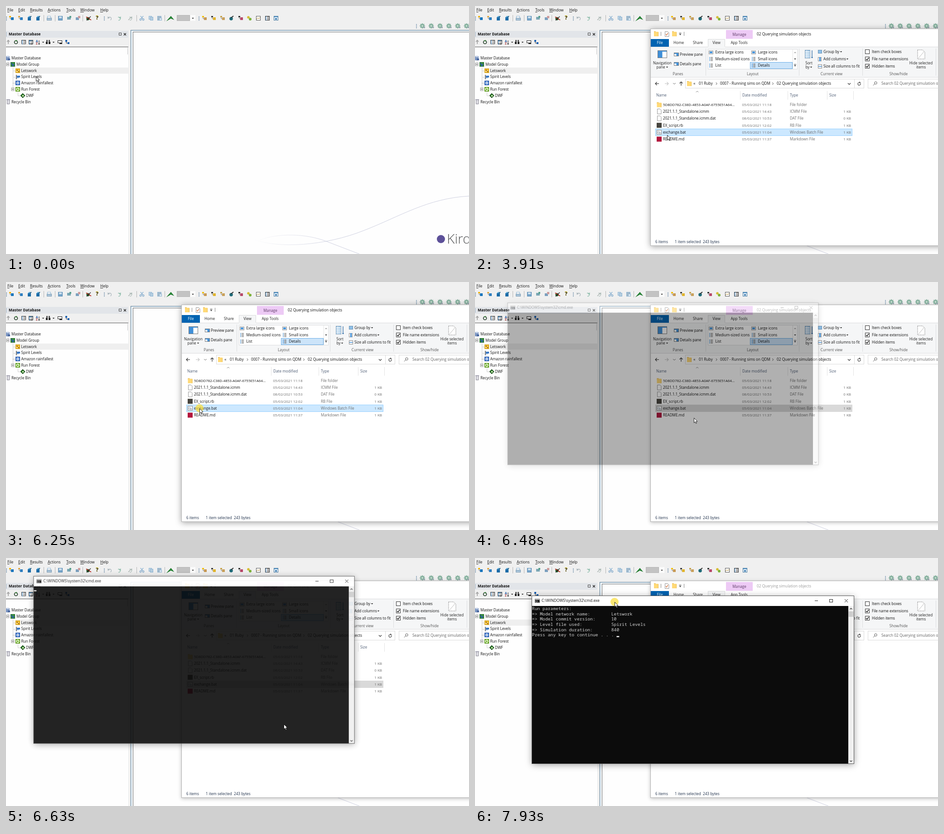
An HTML page with a canvas for the animation above (8 s loop, 1022x548 px).

```html
<!DOCTYPE html>
<html lang="en">
<head>
<meta charset="utf-8">
<title>Running a batch script</title>
<style>
html, body { margin: 0; width: 100%; height: 100%; overflow: hidden; background: #f0f0f0; }
canvas { display: block; }
</style>
</head>
<body>
<canvas id="stage" width="1022" height="548"></canvas>
<script>
const W = 1022, H = 548, LOOP = 8000;
const UI = '"Open Sans", "Noto Sans", sans-serif';
const MONO = '"Noto Sans Mono", "DejaVu Sans Mono", monospace';
const screen2d = document.getElementById('stage').getContext('2d');
let c = screen2d;

// ---- drawing helpers ----
function rect(x, y, w, h, fill, stroke) {
  if (fill) { c.fillStyle = fill; c.fillRect(x, y, w, h); }
  if (stroke) { c.strokeStyle = stroke; c.lineWidth = 1; c.strokeRect(x + .5, y + .5, w - 1, h - 1); }
}
function path(pts, stroke, width = 1, fill) {
  c.beginPath();
  for (let i = 0; i < pts.length; i += 2) c.lineTo(pts[i], pts[i + 1]);
  if (fill) { c.closePath(); c.fillStyle = fill; c.fill(); }
  if (stroke) { c.strokeStyle = stroke; c.lineWidth = width; c.stroke(); }
}
function disc(x, y, r, fill, stroke, width = 1, a = 0, b = 7) {
  c.beginPath();
  c.arc(x, y, r, a, b);
  if (fill) { c.fillStyle = fill; c.fill(); }
  if (stroke) { c.strokeStyle = stroke; c.lineWidth = width; c.stroke(); }
}
function text(s, x, y, color = '#111', size = 8.2, align = 'left', weight = 400, family = UI) {
  c.font = `${weight} ${size}px ${family}`;
  c.textAlign = align;
  c.fillStyle = color;
  c.fillText(s, x, y + 2.9);
}
const mid = (s, x, y, color = '#222') => text(s, x, y, color, 8.2, 'center');
const down = (x, y, color = '#222', r = 2.2) => path([x - r, y - 1, x + r, y - 1, x, y + r - .8], null, 0, color);
const chevron = (x, y, dx, dy, color = '#444', w = 1) =>
  path(dx ? [x - dx, y - 2.5, x + dx, y, x - dx, y + 2.5] : [x - 3, y - dy, x, y + dy, x + 3, y - dy], color, w);
function layer(draw) {
  const cv = document.createElement('canvas');
  cv.width = W; cv.height = H;
  c = cv.getContext('2d');
  draw();
  c = screen2d;
  return cv;
}
function frameWithShadow(x, y, w, h, alpha, blur) {
  c.save();
  c.shadowColor = `rgba(0,0,0,${alpha})`;
  c.shadowBlur = blur;
  c.shadowOffsetY = 2;
  rect(x, y, w, h, '#fff');
  c.restore();
}

// ---- small icons, centred on x, y ----
function grip(x, y) { for (let i = -4; i <= 4; i += 2.6) rect(x - .7, y + i, 1.5, 1.3, '#466f94'); }
function mini(x, y, a, b) {
  rect(x - 1, y - 2, 6, 6, b);
  rect(x - 5, y - 5, 4, 3, a);
  path([x - 3, y - 2, x - 3, y + 1, x - 1, y + 1], '#666', .8);
}
function folder(x, y) {
  rect(x - 5, y - 5, 4, 3, '#e3b34b');
  rect(x - 5, y - 4, 10, 10, '#ffd977');
  rect(x + 4, y - 3, 1, 9, '#e8bb50');
}
function sheet(x, y) {
  path([x - 4, y - 5.5, x + 2, y - 5.5, x + 4.5, y - 3, x + 4.5, y + 5.5, x - 4, y + 5.5, x - 4, y - 5.5], '#8a8a8a', .9, '#fff');
}
function pane(x, y, w, h, side) {
  rect(x, y, w, h, '#fff', '#777');
  rect(x + 1, y + 1, w - 2, 2, '#4d9be0');
  rect(side ? x + w / 2 : x + 1, y + 2, w / 2 - 1, h - 3, '#3f8fd8');
}
function rows(x, y, color = '#777') {
  for (let i = 0; i < 4; i++) {
    rect(x - 4, y - 4 + i * 2.4, 2, 1.2, '#3a86c8');
    rect(x - 1, y - 4 + i * 2.4, 5, 1.2, color);
  }
}
function gear(x, y) {
  for (let i = 0; i < 8; i++) {
    const a = i * Math.PI / 4;
    path([x, y, x + 5.8 * Math.cos(a), y + 5.8 * Math.sin(a)], '#86ad9d', 2.2);
  }
  disc(x, y, 4.2, '#86b39f');
  disc(x, y, 1.6, '#e8eeeb');
  rect(x + 2, y + 2, 4, 3, '#9aa6b0');
}
function arrowBack(x, y, s, color) {
  disc(x, y + 1, 3.5, null, color, 1.3, s > 0 ? 3.6 : 4.2, s > 0 ? 7.4 : 8.1);
  path([x - 4.5 * s, y - 4, x - 4.5 * s, y + 1, x, y - .5], null, 0, color);
}
function toggle(x, y) {
  rect(x - 3.5, y - 3.5, 7, 7, '#fff', '#999');
  path([x - 2, y, x + 2, y], '#333');
}

// ---- main application ----
function menuBar() {
  const items = [['File', 3], ['Edit', 27], ['Results', 53], ['Actions', 92], ['Tools', 133], ['Window', 164], ['Help', 208]];
  for (const [s, x] of items) {
    text(s, x, 9, '#111', 8.4);
    rect(x, 13, c.measureText(s[0]).width, .9, '#222');
  }
}
function toolbar() {
  const y = 27, grey = '#a8b4ba', blue = '#8fb5d3';
  for (const x of [1, 217, 426]) grip(x, y);
  for (const x of [84, 109, 170, 289, 351]) rect(x - 1, 20, 1, 14, '#b5b5b5');
  mini(12, y, '#f2b200', '#1976bd');
  mini(32, y, '#e0a63c', '#2f7fc0');
  for (const x of [52, 71]) {
    rect(x - 4, y - 2, 7, 7, '#1c6ca8');
    path([x - 4, y - 2, x - 1, y - 5, x + 5, y - 5, x + 3, y - 2], null, 0, '#5ba7d6');
    path([x + 1, y - 2, x + 4, y - 5], '#222', 1);
  }
  rect(91, 22, 8, 5, '#fff', blue);
  rect(90, 26, 11, 6, '#a9c4d9', '#7f9db5');
  rect(115, 22, 10, 10, '#77a6cb', '#5f8fb5');
  rect(117, 23, 6, 4, '#cfe0ee');
  rect(135, 24, 8, 6, '#7ba7b5'); rect(140, 22, 4, 4, '#58a08d');
  rect(154, 25, 7, 6, '#7ba0bf'); rect(159, 22, 5, 5, '#cf9c9c');
  disc(181, 28, 3.6, '#1d5f2b'); path([177, 24, 188, 31], '#b3261e', 1.6); path([178, 32, 187, 23], '#222', 1.2);
  text('?', 201, y, '#e2c300', 13, 'center', 700); text('?', 201, y, '#222', 11, 'center', 700);
  arrowBack(229, y, 1, grey); arrowBack(249, y, -1, '#8dbcab');
  arrowBack(274, y, -1, '#b3c1bd'); path([270, 31, 277, 24], '#a5b1ad', 1.3);
  path([297, 22, 302, 29], blue, 1.4); path([303, 22, 298, 29], blue, 1.4);
  disc(297, 30, 1.8, null, '#7ca4c7', 1.2); disc(303, 30, 1.8, null, '#7ca4c7', 1.2);
  rect(315, 22, 7, 8, '#c5d8e7', blue); rect(318, 24, 7, 8, '#b4cde0', blue);
  rect(334, 22, 9, 10, '#a3b9ca', blue); rect(338, 26, 6, 6, '#dbe7f0', blue);
  path([357, 31, 364, 23, 369, 29, 364, 27], '#1f7a2e', 1.4, '#2f9440');
  rect(377, 20, 29, 13, '#c3c3c3', '#b5b5b5');
  rect(407, 20, 11, 13, '#fbfbfb'); down(412.5, 27);
  mini(438, y, '#f3c000', '#c89a55');
  mini(458, y, '#3b3b3b', '#e1b52f');
  mini(478, y, '#c6a248', '#c9a15c');
  disc(497, 28, 3.8, '#1e6a78'); path([497, 26, 502, 22], '#333', 2);
  mini(518, y, '#333', '#b8496a');
  disc(535, 25, 2.8, '#d6bd35'); disc(539, 29, 3, '#7db23a');
  rect(552, 22, 10, 10, '#fff', '#555'); path([553, 29, 556, 26, 558, 28, 561, 25], '#b08a2c');
  rect(572, 22, 10, 10, '#fff', '#444'); rows(577, 27, '#666');
  rect(591, 22, 10, 10, '#e7f0f8', '#47799f'); rect(592, 23, 8, 2, '#6aa2cf'); rect(594, 27, 4, 3, '#2f74ad');
  grip(906, 44);
  for (let i = 0; i < 6; i++) gear(919 + i * 19.5, 44);
}
function sidePanel() {
  rect(0, 55, 270, 15, '#e2e5e9');
  grip(0, 62);
  text('Master Database', 6, 62.5, '#111', 8.3, 'left', 700);
  rect(249, 59, 6, 6, null, '#444');
  path([260, 60, 265, 65], '#222', 1.2); path([265, 60, 260, 65], '#222', 1.2);
  path([5, 84, 5, 77], '#9a9a9a', 1.6); path([2, 79, 5, 75.5, 8, 79], '#9a9a9a', 1.3);
  disc(22, 80, 3.5, null, '#263f2b', 1.7); path([20, 76, 24, 75, 23, 79], null, 0, '#3d8b3d');
  rect(34, 75, 10, 9, '#fff', '#555'); rows(39, 80);
  rect(50, 75, 10, 9, '#fff', '#555'); rect(51, 76, 8, 2, '#387fb5'); rows(55, 81);
  text('A', 66, 77, '#1b57a5', 6.5, 'left', 700); text('Z', 66, 82.5, '#a33', 6.5, 'left', 700);
  path([73, 76, 73, 84], '#222'); down(73, 84); down(82, 80); down(105, 80);
  rect(88, 79, 4, 5, '#222'); rect(94, 79, 4, 5, '#222'); rect(89, 75, 3, 5, '#555'); rect(94, 75, 3, 5, '#555');
  rect(114, 76, 10, 6, '#fff', '#222'); rect(118, 81, 6, 3, '#222');
  rect(131, 75, 4, 4, '#1a5fb0'); rect(136, 80, 4, 4, '#1a5fb0'); path([133, 79, 133, 82, 136, 82], '#333');
  rect(0, 90, 270, 458, '#fefefe');
  rect(0, 90, 270, 1, '#555');
  rect(268, 92, 1, 15, '#c4c4c4');
}
function tree() {
  rect(32, 136, 238, 13.5, '#efefef');
  c.setLineDash([1, 1]);
  path([15.5, 135, 15.5, 184], '#999');
  for (const y of [143.5, 157.5, 170.5]) path([15, y, 21, y], '#999');
  path([26.5, 190, 26.5, 198.5, 32, 198.5], '#999');
  path([4.5, 120, 4.5, 126], '#999');
  c.setLineDash([]);
  rect(0, 111, 8, 9, '#7f98c3'); rect(1, 110, 6, 3, '#c5d2e8'); rect(4, 116, 5, 4, '#4a68a0');
  toggle(4, 129); toggle(15, 184);
  rect(10, 124, 10, 10, '#39923a', '#23692c'); path([12, 126, 15, 132, 18, 128], '#2d56b3', 2);
  rect(21, 138, 10, 10, '#f0bf2d', '#c9971b'); path([23, 146, 25, 142, 28, 144], '#fff'); rect(24, 141, 2, 2, '#7b3b12'); rect(27, 144, 2, 2, '#7b3b12');
  rect(22, 152, 1.5, 10, '#555'); rect(24, 154, 7, 4, '#3a78c4'); rect(24, 158, 4, 1.5, '#88aed8');
  rect(21, 165, 10, 10, '#3c74cb', '#2453a0'); disc(26, 170, 3, '#dce9fa'); path([24, 169, 26, 171, 28, 169], '#2453a0');
  rect(21, 179, 10, 10, '#6fb321', '#4c8712'); disc(26, 184, 2.7, null, '#fff', 1.4);
  path([37, 193, 42, 198, 37, 203, 32, 198], '#163b16', 1, '#2f7d2f'); rect(36, 197, 3, 3, '#e3f0c2');
  rect(2, 207, 6, 10, '#e0e0e6', '#888793'); rect(1, 206, 8, 2, '#a6a5b3');
  const labels = [['Master Database', 12], ['Model Group', 23], ['Letswork', 33.5], ['Spirit Levels', 33.5],
    ['Amazon rainfallest', 33.5], ['Run Forest', 33.5], ['DWF', 44], ['Recycle Bin', 12]];
  labels.forEach(([s, x], i) => text(s, x, 115 + i * 13.82));
}
function workspace() {
  rect(275, 53, W, H, '#d3e4f0');
  rect(275, 53, W, 1, '#5f7f95'); rect(275, 53, 1, H, '#5f7f95');
  rect(277, 55, W, H, '#f4f8fb');
  rect(280, 57, W, 1, '#6a6a6a'); rect(280, 57, 1, H, '#6a6a6a');
  rect(281, 58, W, H, '#fefefe');
  const g = c.createLinearGradient(545, 0, 720, 0);
  g.addColorStop(0, '#fefefe'); g.addColorStop(1, '#cdcfdf');
  c.strokeStyle = g;
  c.lineWidth = 1;
  c.beginPath();
  c.moveTo(545, 515);
  c.bezierCurveTo(600, 537, 705, 530, 790, 496);
  c.bezierCurveTo(870, 465, 930, 425, 1022, 420);
  c.moveTo(560, 517);
  c.bezierCurveTo(600, 502, 660, 502, 707, 520);
  c.lineTo(780, 548);
  c.stroke();
  disc(960, 515, 9, '#5d5199');
  text('Kird', 973, 522, '#58595b', 30, 'left', 300);
}
function app() {
  rect(0, 0, W, H, '#f0f0f0');
  menuBar(); toolbar(); sidePanel(); tree(); workspace();
}

// ---- file explorer ----
function ribbon() {
  rect(388, 90, W, 67, '#f5f6f7');
  rect(388, 90, W, 1, '#dadbdc'); rect(388, 157, W, 1, '#dadbdc');
  rect(388, 73, 40, 17, '#0063b1');
  mid('File', 408, 81.5, '#fff'); mid('Home', 449.5, 81.5); mid('Share', 492, 81.5);
  rect(514, 73, 38, 18, '#f5f6f7');
  path([514.5, 90, 514.5, 73.5, 551.5, 73.5, 551.5, 90], '#dadbdc');
  mid('View', 533, 81.5); mid('App Tools', 583, 81.5);
  for (const x of [509, 715, 855, 1017]) rect(x, 94, 1, 60, '#dcdddf');
  pane(403, 98, 21, 17);
  mid('Navigation', 413.5, 126); mid('pane', 410, 135); down(424, 135);
  pane(439, 103, 11, 8, 1); text('Preview pane', 452, 107);
  pane(439, 124, 11, 8, 1); text('Details pane', 452, 128);
  rect(514, 95, 198, 45, '#fff', '#dcdddf');
  rect(701, 95, 1, 45, '#e2e2e2');
  rect(607, 124, 94, 15, '#cce4f9', '#6aaee8');
  const views = [['Extra large icons', 'Large icons'], ['Medium-sized icons', 'Small icons'], ['List', 'Details']];
  views.forEach((pair, i) => pair.forEach((s, j) => {
    const x = 521 + j * 94, y = 102.5 + i * 14.4;
    if (i) rows(x, y); else { rect(x - 5, y - 4, 10, 8, '#fff', '#888'); rect(x - 3, y - 2, 6, 4, '#3f8fd8'); }
    text(s, x + 9.5, y);
  }));
  path([704, 104, 706.5, 101, 709, 104], null, 0, '#aaa'); down(706.5, 117); down(706.5, 132); path([704, 129, 709, 129], '#333');
  rect(728, 97, 12, 19, '#fff', '#8ba6bd');
  for (let i = 0; i < 5; i++) { rect(729, 98 + i * 3.6, 10, 1.8, '#8dbce2'); rect(732, 98 + i * 3.6, 1, 2, '#fff'); }
  path([744, 98, 744, 114], '#1f5f9e', 1.2); down(744, 114, '#1f5f9e');
  mid('Sort', 737, 126); mid('by', 734, 135); down(742, 135);
  rect(757, 97, 9, 8, '#8fc0e8', '#6b93b5'); text('Group by', 769, 101); down(808, 101);
  rect(757, 113, 8, 9, '#fff', '#888'); rect(760, 113, 3, 9, '#3f8fd8'); text('Add columns', 769, 117); down(822, 117);
  rect(757, 129, 9, 9, '#fff', '#888'); path([758, 133.5, 765, 133.5], '#3f8fd8', 1.5); text('Size all columns to fit', 769, 133);
  ['Item check boxes', 'File name extensions', 'Hidden items'].forEach((s, i) => {
    const y = 101 + i * 16;
    rect(861, y - 5, 10, 10, '#fff', '#333');
    if (i) path([863, y, 865.3, y + 2.4, 869, y - 2.5], '#111', 1.4);
    text(s, 876, y);
  });
  c.setLineDash([2, 1.5]);
  path([977, 97, 988, 97, 993, 102, 993, 117, 977, 117, 977, 97], '#777', 1, '#fff');
  c.setLineDash([]);
  path([979, 115, 991, 101], '#b9b9b9');
  mid('Hide selected', 984.5, 126); mid('items', 984.5, 135);
  const groups = [['Panes', 448], ['Layout', 613], ['Current view', 787], ['Show/hide', 935]];
  for (const [s, x] of groups) mid(s, x, 150, '#555');
}
function addressBar() {
  path([406, 171.5, 398, 171.5], '#333', 1.1); path([401.5, 168, 398, 171.5, 401.5, 175], '#333', 1.1);
  path([419, 171.5, 427, 171.5], '#c4c4c4', 1.1); path([423.5, 168, 427, 171.5, 423.5, 175], '#c4c4c4', 1.1);
  chevron(440, 171.5, 0, 1.2, '#777');
  path([455, 176, 455, 167.5], '#333', 1.2); path([451.5, 171, 455, 167.5, 458.5, 171], '#333', 1.2);
  rect(464, 161, 395, 21, '#fff', '#d9d9d9');
  folder(473, 171);
  text('«', 482, 171, '#222', 9);
  text('01 Ruby', 494, 171.5);
  text('0007 - Running sims on QDM', 541, 171.5);
  text('02 Querying simulation objects', 666, 171.5, '#111', 8.3);
  chevron(533, 171.5, 1.2, 0); chevron(657.5, 171.5, 1.2, 0);
  chevron(826, 172, 0, 1.5, '#333', 1.2);
  rect(837, 161, 1, 21, '#d9d9d9');
  disc(848, 172, 3, null, '#333', 1.1, -.4, 4.6); path([848, 167, 851.5, 169, 848.5, 171], null, 0, '#333');
  rect(867, 161, W, 21, '#fff', '#d9d9d9');
  disc(884.5, 170, 2.7, null, '#555'); path([882.5, 172, 879, 175.5], '#555');
  text('Search 02 Querying simulation objects', 897, 171.5, '#606060', 8.3);
}
function fileList(active) {
  const head = [['Name', 400], ['Date modified', 590], ['Type', 695], ['Size', 782]];
  for (const [s, x] of head) text(s, x, 197, '#4c5b73');
  for (const x of [585, 690, 777, 835]) rect(x, 188, 1, 19, '#e3e3e3');
  path([488, 190.5, 490.5, 188, 493, 190.5], '#777');
  rect(398, 271, 435, 16, active ? '#cce8ff' : '#d9d9d9', active ? '#99d1ff' : null);
  const files = [
    ['5D8DD782-C38D-4853-A0AF-6755E51A64...', '05/03/2021 11:18', 'File folder', ''],
    ['2021.1.1_Standalone.icmm', '05/02/2021 14:43', 'ICMM File', '1 KB'],
    ['2021.1.1_Standalone.icmm.dat', '08/02/2021 10:53', 'DAT File', '0 KB'],
    ['EX_script.rb', '05/03/2021 12:02', 'RB File', '1 KB'],
    ['exchange.bat', '05/03/2021 11:04', 'Windows Batch File', '1 KB'],
    ['README.md', '05/03/2021 11:37', 'Markdown File', '1 KB']];
  files.forEach(([name, date, type, size], i) => {
    const y = 217.7 + i * 15.3;
    if (i === 0) folder(406.5, y);
    else if (i < 3) sheet(406.5, y);
    else if (i === 4) {
      rect(401, y - 5, 11, 10, '#fff', '#888');
      disc(405, y, 2, null, '#8a9aa8'); disc(408, y + 1.5, 1.6, null, '#8a9aa8');
    } else rect(401, y - 5.5, 11, 11, i === 3 ? '#47453f' : '#b3153d');
    text(name, 415, y, '#111', i ? 8.15 : 7.9);
    text(date, 589.5, y, '#6d6d6d', 8);
    text(type, 695, y, '#6d6d6d');
    text(size, 830, y, '#6d6d6d', 8, 'right');
  });
}
function explorer(active) {
  frameWithShadow(387, 50, 700, 480, active ? .36 : .24, active ? 13 : 8);
  rect(387, 50, 700, 480, '#fff', active ? '#b4b4b4' : '#b0b0b0');
  folder(400, 61); rect(410, 57, 1, 9, '#888');
  sheet(423.5, 62); path([421, 62, 423, 64.5, 426, 59.5], '#d0672a', 1.2);
  folder(440, 61); down(453, 63); path([450.5, 60, 455.5, 60], '#222'); rect(461, 57, 1, 9, '#888');
  rect(554, 53, 59, 19.5, '#edcaf5');
  mid('Manage', 583.5, 63, '#5d3a66');
  text('02 Querying simulation objects', 622, 62, active ? '#111' : '#9a9a9a', 8.3);
  ribbon(); addressBar(); fileList(active);
  text('6 items', 398, 521, '#1e2f4a'); text('1 item selected', 441, 521, '#1e2f4a'); text('243 bytes', 503, 521, '#1e2f4a');
}

// ---- tooltip and console ----
function tooltip() {
  c.save();
  c.shadowColor = 'rgba(0,0,0,.4)'; c.shadowBlur = 3; c.shadowOffsetX = c.shadowOffsetY = 1.5;
  rect(426, 292, 133, 37, '#fff');
  c.restore();
  rect(426, 292, 133, 37, null, '#8a8a8a');
  ['Type: Windows Batch File', 'Size: 243 bytes', 'Date modified: 05/03/2021 11:04'].forEach((s, i) =>
    text(s, 431, 299.5 + i * 10.9, '#575757', 8));
}
function consoleWindow(lines) {
  frameWithShadow(59.5, 39.5, 711, 371, .4, 15);
  rect(59, 39, 712, 372, '#fff', '#555');
  rect(60, 62, 698, 348, '#0c0c0c');
  rect(66, 46, 11, 9, '#111', '#777'); rect(67, 47, 9, 1.5, '#ddd');
  text('C:\\', 67.5, 51, '#fff', 4.5, 'left', 700);
  text('C:\\WINDOWS\\system32\\cmd.exe', 81, 50.5, '#111', 8.4);
  path([684, 50.5, 691, 50.5], '#222');
  rect(716, 47, 8, 7, null, '#222');
  path([750, 47, 757, 54], '#222'); path([757, 47, 750, 54], '#222');
  rect(758, 62, 12, 348, '#f0f0f0');
  rect(758.5, 74, 11, 12, '#cdcdcd');
  path([761.5, 69.5, 764, 67, 766.5, 69.5], '#333', 1.2);
  path([761.5, 403.5, 764, 406, 766.5, 403.5], '#333', 1.2);
  lines.forEach((s, i) => text(s, 59.8, 68 + i * 11.67, '#d0d0d0', 9.72, 'left', 400, MONO));
}
const param = (label, value) => `=> ${label}:`.padEnd(30) + value;
const output = ['Run parameters:', param('Model network name', 'Letswork'), param('Model commit version', '10'),
  param('Level file used', 'Spirit Levels'), param('Simulation duration', '840'), 'Press any key to continue . . . '];

const layers = {
  app: layer(app), active: layer(() => explorer(true)), idle: layer(() => explorer(false)),
  tip: layer(tooltip), blank: layer(() => consoleWindow([])), done: layer(() => consoleWindow(output))
};

// ---- motion ----
// Number of steps passed out of n, the first at t0 and the last at t1; times are rounded to 10 ms.
function steps(t, t0, t1, n) {
  if (t < t0) return 0;
  return Math.min(n, Math.floor((t + 5 - t0) / (t1 - t0) * (n - 1)) + 1);
}
function along(pts, u) {
  const f = u * (pts.length - 1), i = Math.min(Math.floor(f), pts.length - 2);
  return [0, 1].map(k => pts[i][k] + (pts[i + 1][k] - pts[i][k]) * (f - i));
}
const wander = [[49, 152], [22, 178], [2, 198], [36, 200], [64, 178], [44, 138], [20, 103], [64, 106]];
const toTitle = [[613, 367], [592, 330], [510, 248], [395, 160], [310, 100], [265, 76], [250, 67], [247, 62], [244, 57], [242, 53], [242, 53]];
const drag = t => [0, .2, .65, 1][steps(t, 7770, 7930, 3)];

function pointer(t) {
  if (t < 70) return [66, 155.5];
  if (t < 1100) return along(wander, steps(t, 260, 1020, 11) / 11);
  if (t < 3910) {
    const u = steps(t, 1100, 1800, 10) / 10;
    return along([[64, 106], [364, 552]], u * u * (3 - 2 * u));
  }
  if (t < 4160) return [424, 285];
  if (t < 4230) return [425, 282];
  if (t < 4380) return [425.5, 281];
  if (t < 6480) return [427, 279];
  if (t < 6940) return along([[427, 279], [483, 300], [560, 340], [613, 367]], steps(t, 6480, 6630, 3) / 3);
  const [x, y] = along(toTitle, steps(t, 6940, 7690, 10) / 10), d = drag(t);
  return [x + 66 * d, y + 44 * d];
}
function drawPointer(x, y) {
  c.save();
  c.translate(x + .5, y + .5);
  c.lineJoin = 'round';
  path([0, 0, 0, 10.6, 2.5, 8.4, 4.2, 12.2, 5.9, 11.4, 4.2, 7.8, 7.5, 7.6, 0, 0], '#111', .9, '#fff');
  c.restore();
}
function drawConsole(t) {
  const k = steps(t, 6480, 6710, 4) - 1, s = [.965, .986, .996, 1][k], d = drag(t), done = t >= 7770;
  c.save();
  c.globalAlpha = [.32, .65, .9, 1][k];
  c.translate(415 + 66 * d, 225 + 44 * d);
  c.scale(s, s);
  c.translate(-415, -225);
  c.drawImage(done ? layers.done : layers.blank, 0, 0);
  const blinkOff = t >= 6940 && t < 7395;
  if (k > 0 && !blinkOff) rect(done ? 246.5 : 60, done ? 128.4 : 70.5, 5.8, 2.5, '#f2f2f2');
  c.restore();
}
function draw(t) {
  c.drawImage(layers.app, 0, 0);
  if (t >= 3910) c.drawImage(t < 6480 ? layers.active : layers.idle, 0, 0);
  if (t >= 5160 && t < 6080) {
    c.globalAlpha = [0, .58, .82, 1][steps(t, 5160, 5320, 3)];
    c.drawImage(layers.tip, 0, 0);
    c.globalAlpha = 1;
  }
  if (t >= 6480) drawConsole(t);
  const [x, y] = pointer(t), click = steps(t, 6080, 6310, 4);
  if (click === 1 || click === 3 || t >= 7770) disc(x, y, 9, 'rgba(250,222,60,.72)');
  drawPointer(x, y);
}

let start;
function tick(now) {
  start ??= now;
  draw((now - start) % LOOP);
  requestAnimationFrame(tick);
}
draw(0);
requestAnimationFrame(tick);
</script>
</body>
</html>
```
